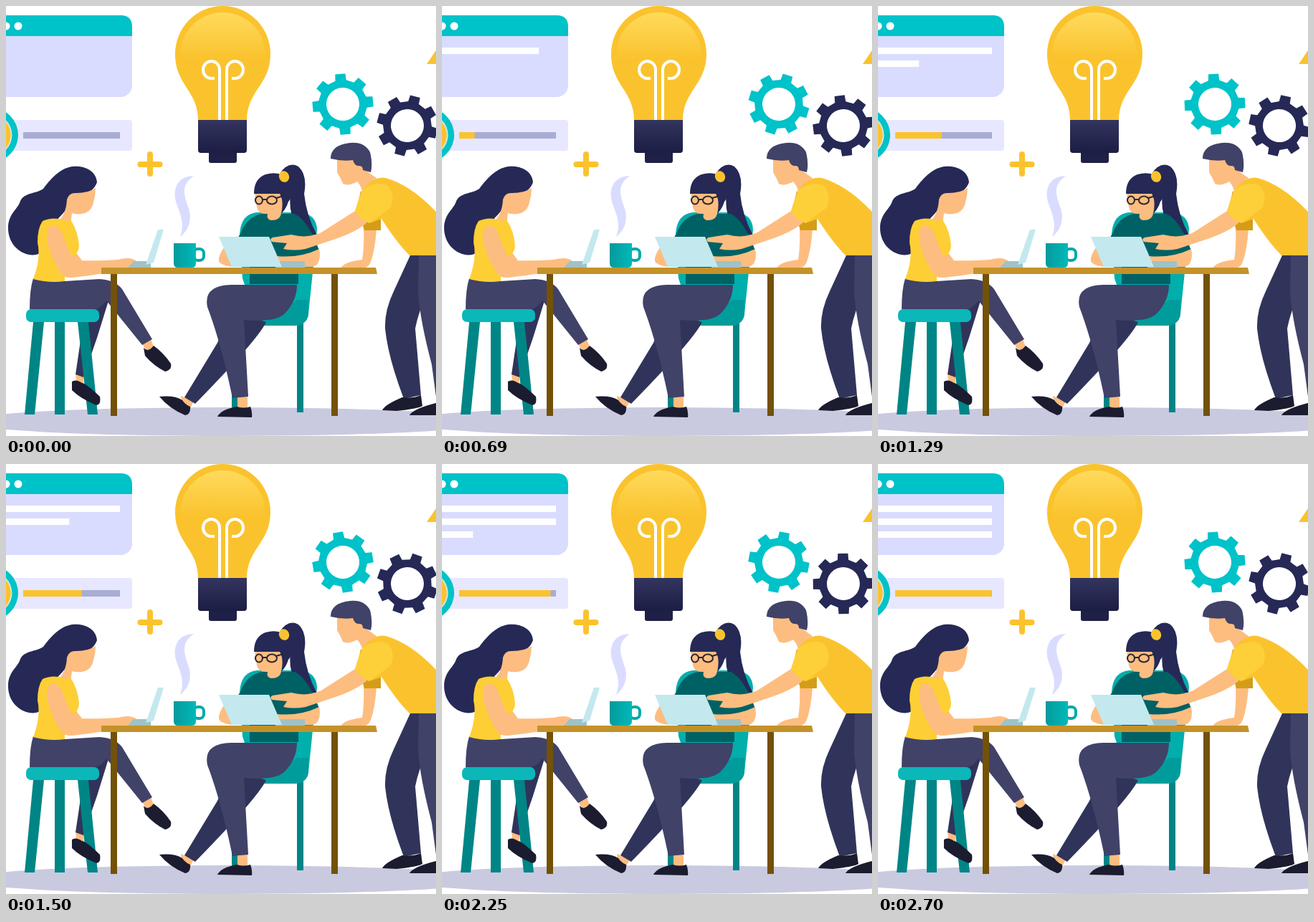
An HTML page that plays this animation: 600 px wide and 600 px high, repeating every 2730 ms.

```html
<!DOCTYPE html>
<html lang="en">
<head>
<meta charset="utf-8">
<title>Team at a desk</title>
<style>
html, body { margin: 0; width: 100%; height: 100%; overflow: hidden; background: #fff; }
svg { display: block; width: 100%; height: 100%; }
.navy { fill: #262956; }
.pants { fill: #404268; }
.pants-dark { fill: #31345a; }
.shoe { fill: #1c1c30; }
.skin { fill: #fdbd80; }
.yellow { fill: #fac32e; }
.teal { fill: #00c2c9; }
.chair { fill: #00aeac; }
.leg { fill: #008586; }
.glass { fill: #c3e8ee; }
.grey { fill: #9fc2c6; }
</style>
</head>
<body>
<svg viewBox="0 0 600 600">
  <defs>
    <linearGradient id="glow" x2="0" y2="1">
      <stop stop-color="#ffda5c"/><stop offset=".55" stop-color="#fac32e"/>
    </linearGradient>
    <linearGradient id="cap" x2="0" y2="1">
      <stop stop-color="#34355f"/><stop offset="1" stop-color="#1c1d43"/>
    </linearGradient>
    <linearGradient id="mug">
      <stop stop-color="#069a9c"/><stop offset="1" stop-color="#00b9b9"/>
    </linearGradient>
  </defs>

  <ellipse cx="310" cy="580" rx="370" ry="20" fill="#c9cae0"/>

  <!-- browser window -->
  <rect x="-34" y="13" width="210" height="114" rx="16" fill="#dadcff"/>
  <path class="teal" d="M-34 42V13H160Q176 13 176 29V42Z"/>
  <g fill="#fff"><circle cy="28" r="5.5"/><circle cx="17" cy="28" r="5.5"/></g>
  <g id="lines" fill="#fff">
    <rect x="-17" y="58" height="9"/><rect x="-17" y="76" height="9"/><rect x="-17" y="94" height="9"/>
  </g>

  <!-- progress card -->
  <rect x="-34" y="159" width="210" height="43" rx="4" fill="#e7e8ff"/>
  <circle class="teal" cx="-21" cy="180" r="38"/>
  <circle cx="-21" cy="180" r="29.5" fill="#d3e6df"/>
  <circle class="yellow" cx="-21" cy="180" r="27.5"/>
  <rect x="24" y="176" width="135" height="9" fill="#a9acd3"/>
  <rect id="bar" class="yellow" x="24" y="176" height="9"/>

  <!-- light bulb -->
  <path class="yellow" d="M268 160C268 118 236 110 236 67A66.5 67 0 0 1 369 67C369 110 336 118 336 160Z"/>
  <ellipse cx="302.500" cy="67" rx="59" ry="58" fill="url(#glow)"/>
  <g fill="none" stroke="#fff" stroke-width="4">
    <path d="M298 160V89A11.500 12 0 1 0 287 101H291"/>
    <path d="M308 160V89A11.500 12 0 1 1 319 101H315"/>
  </g>
  <path fill="url(#cap)" d="M268 159H336V201Q336 205 332 205H272Q268 205 268 201Z"/>
  <path fill="#1f2047" d="M283 205H322V216Q322 219 319 219H286Q283 219 283 216Z"/>

  <path d="M187.500 221H214.500M201 207V234" stroke="#fac32e" stroke-width="8" stroke-linecap="round"/>
  <path class="yellow" d="M587 81L600 62V81Z"/>

  <path id="gearA" class="teal" fill-rule="evenodd"/>
  <path id="gearB" class="navy" fill-rule="evenodd"/>

  <!-- woman on the stool -->
  <path class="leg" d="M68 441H82V570H68Z"/>
  <path class="skin" d="M97 512L108 514V528L98 524ZM190 471L202 465L207 478L196 482Z"/>
  <path class="pants-dark" d="M104 415L145 405L127 463L108 518L97 514L108 440Z"/>
  <path class="pants" d="M38 380Q33 395 33 423H126Q136 418 140 411L190 473L204 465L162 395Q152 382 130 381L82 384Z"/>
  <path class="leg" d="M38 441H53L40 570H26ZM100 441H115L128 570H114Z"/>
  <rect x="28" y="423" width="102" height="18" rx="7" fill="#0bb7b9"/>
  <path class="shoe" d="M192 477Q198 484 206 474Q220 484 230 499Q232 508 222 510Q206 502 194 488ZM92 524Q98 520 106 526Q111 526 131 545Q133 556 126 557Q104 548 92 536Z"/>
  <path class="navy" d="M127 246C126 229 108 222 92 224C74 227 62 242 52 255C42 262 26 260 20 272C16 285 2 290 3 312C4 335 24 350 42 347C60 343 66 320 70 300C78 290 92 280 92 262C104 264 120 264 127 246Z"/>
  <path class="skin" d="M85 270Q88 260 98 261Q115 261 125 254Q125 264 122 274Q119 288 106 290Q97 291 92 289L90 306L70 303Q84 292 85 270Z"/>
  <path class="skin" d="M93 338L106 355L90 359Z"/>
  <path fill="#fdcf35" d="M51 300Q62 295 74 297Q82 302 90 298Q101 315 102 335Q101 347 91 350L82 356V384Q60 387 38 381Q49 352 44 330Q44 310 51 300Z"/>
  <path class="skin" d="M57 322Q57 306 67 306Q77 309 81 325L94 355Q130 356 156 354Q174 349 182 356L174 364Q140 374 100 378Q84 381 78 375Q58 343 57 322Z"/>
  <path class="grey" d="M170 365L178 356H202V365Z"/>
  <path class="glass" d="M212 312H220L206 358L195 361Z"/>

  <!-- mug and steam -->
  <path fill="#dadcff" d="M262 237C240 237 232 255 237 273C243 291 250 302 243 322C257 311 260 295 254 280C248 262 244 250 262 237Z"/>
  <rect x="262" y="339" width="14" height="16" rx="6" fill="none" stroke="#00a9aa" stroke-width="4"/>
  <path fill="url(#mug)" d="M234 331H265V359Q265 365 259 365H240Q234 365 234 359Z"/>

  <!-- seated woman with laptop -->
  <path class="leg" d="M406 440H415V567H406ZM315 520H324V560H315Z"/>
  <path class="chair" d="M326 318Q328 290 350 288H410Q433 290 434 312L422 430Q420 446 400 446H352L330 380Z"/>
  <path fill="#009c9b" d="M406 410H422V430Q420 446 400 446H355Z"/>
  <path class="navy" d="M382 234Q394 216 408 224Q421 236 416 262Q419 292 434 320Q416 318 404 302Q394 288 397 262Q399 245 382 234Z"/>
  <path fill="#006165" d="M327 318Q336 293 358 290H403Q422 300 437 341L408 352V388H340V362L312 340Z"/>
  <path class="skin" d="M347 260H386Q390 275 384 289Q383 299 370 299Q363 298 365 290Q352 291 350 281Z"/>
  <path class="navy" d="M346 262Q346 241 362 235Q384 229 396 244Q403 264 394 273Q391 283 384 290Q388 272 382 262Z"/>
  <ellipse class="yellow" cx="388" cy="238" rx="7" ry="8" transform="rotate(-25 388 238)"/>
  <g fill="none" stroke="#2b2630" stroke-width="2">
    <ellipse cx="353" cy="271" rx="5" ry="5.500"/><ellipse cx="371" cy="271" rx="7" ry="5.500"/>
    <path d="M358 270H364M377 268L387 265"/>
  </g>
  <path class="skin" d="M304 337Q294 352 298 358Q304 363 317 364ZM437 339Q441 360 428 364H402L378 358V349Q410 352 437 339ZM244 544L262 552L257 561L245 555ZM323 545H337V562H323Z"/>
  <path class="pants-dark" d="M308 440L330 430L363 441Q352 465 264 555L249 546L295 470Z"/>
  <path class="pants" d="M281 420Q275 390 314 389H406Q406 412 388 430Q374 442 332 438L338 545L316 547Q300 470 281 420Z"/>
  <path class="shoe" d="M214 545Q235 543 246 550Q250 556 257 559Q258 570 250 571Q228 562 214 545ZM295 573Q300 563 322 559Q332 562 341 559Q344 566 343 574Z"/>
  <path class="grey" d="M376 356H417V365H376Z"/>
  <path class="glass" d="M297 322H367L385 364H315Z"/>

  <!-- standing man -->
  <path class="skin" d="M499 311H517Q515 340 509 357Q506 366 495 366H467Q471 357 497 354Q500 335 499 311Z"/>
  <path fill="#d59d16" d="M495 258L523 296V313H500L490 280Z"/>
  <path class="pants-dark" d="M564 348H600L588 400Q576 425 571 450L579 543L555 548Q533 490 529 450Q528 425 541 398Z"/>
  <path class="pants" d="M576 348H600V545L594 500Q578 440 575 400Z"/>
  <path class="shoe" d="M525 564Q529 556 553 546Q568 548 579 543L581 558Q575 562 545 565ZM563 571Q568 562 600 554V571Z"/>
  <path class="skin" d="M487 286L506 300Q492 314 460 325L418 339Q402 342 387 339L392 331L371 329Q367 325 372 323L398 319Q420 325 440 316Z"/>
  <path class="skin" d="M462 212L484 214L500 228L517 240L497 258Q495 250 490 245Q478 252 470 248Q467 240 462 232Z"/>
  <path class="pants" d="M453 213Q453 194 480 191Q500 189 508 204Q512 220 509 232L498 229Q498 222 491 223Q486 222 484 215Q470 217 453 213Z"/>
  <path class="yellow" d="M497 257Q512 237 530 240Q565 250 600 287V348H563Q545 330 524 297L507 303Q492 296 487 286Q492 270 497 257Z"/>
  <path fill="#fdd03a" d="M497 257Q515 244 532 250Q545 264 536 282L507 303Q492 296 487 286Q492 270 497 257Z"/>

  <!-- table -->
  <path fill="#735108" d="M146 373H155V572H146ZM454 373H463V572H454Z"/>
  <path fill="#c4922a" d="M133 365H516L518 374H133Z"/>
</svg>
<script>
const LOOP = 2730;
const byId = id => document.getElementById(id);
const lines = [...byId("lines").children];

// Right edge of each text line as [time, x] points.
const edges = [
  [[0, -17], [250, 22], [690, 135], [850, 159]],
  [[780, -17], [1080, 26], [1500, 88], [1860, 136], [2060, 159]],
  [[2060, -17], [2160, 13], [2250, 43], [2520, 125], [2670, 159]]
];

function track(points, t) {
  if (t <= points[0][0]) return points[0][1];
  for (let i = 1; i < points.length; i++) {
    const [t0, x0] = points[i - 1], [t1, x1] = points[i];
    if (t < t1) return x0 + (x1 - x0) * (t - t0) / (t1 - t0);
  }
  return points[points.length - 1][1];
}

function gearPath() {
  const corners = [];
  for (let tooth = 0; tooth < 8; tooth++) {
    for (const [r, offset] of [[34, -13], [42.8, -9.5], [42.8, 9.5], [34, 13]]) {
      const a = (tooth * 45 - 90 + offset) * Math.PI / 180;
      corners.push((r * Math.cos(a)).toFixed(2) + " " + (r * Math.sin(a)).toFixed(2));
    }
  }
  return `M${corners.join("L")}ZM-23 0A23 23 0 1 0 23 0A23 23 0 1 0 -23 0Z`;
}

function turn(id, x, y, angle) {
  byId(id).setAttribute("transform", `translate(${x} ${y}) rotate(${angle})`);
}

function draw(now) {
  const t = now % LOOP;
  lines.forEach((line, i) => line.setAttribute("width", track(edges[i], t) + 17));
  const progress = (1 - Math.cos(Math.PI * Math.min(1, t / 2640))) / 2;
  byId("bar").setAttribute("width", 134.5 * progress);
  const spin = 90 * t / LOOP;
  turn("gearA", 470, 137, -5 - spin);
  turn("gearB", 560, 167, 15 + spin);
}

byId("gearA").setAttribute("d", gearPath());
byId("gearB").setAttribute("d", gearPath());

const start = performance.now();
function tick() {
  draw(performance.now() - start);
  requestAnimationFrame(tick);
}
tick();
</script>
</body>
</html>
```
